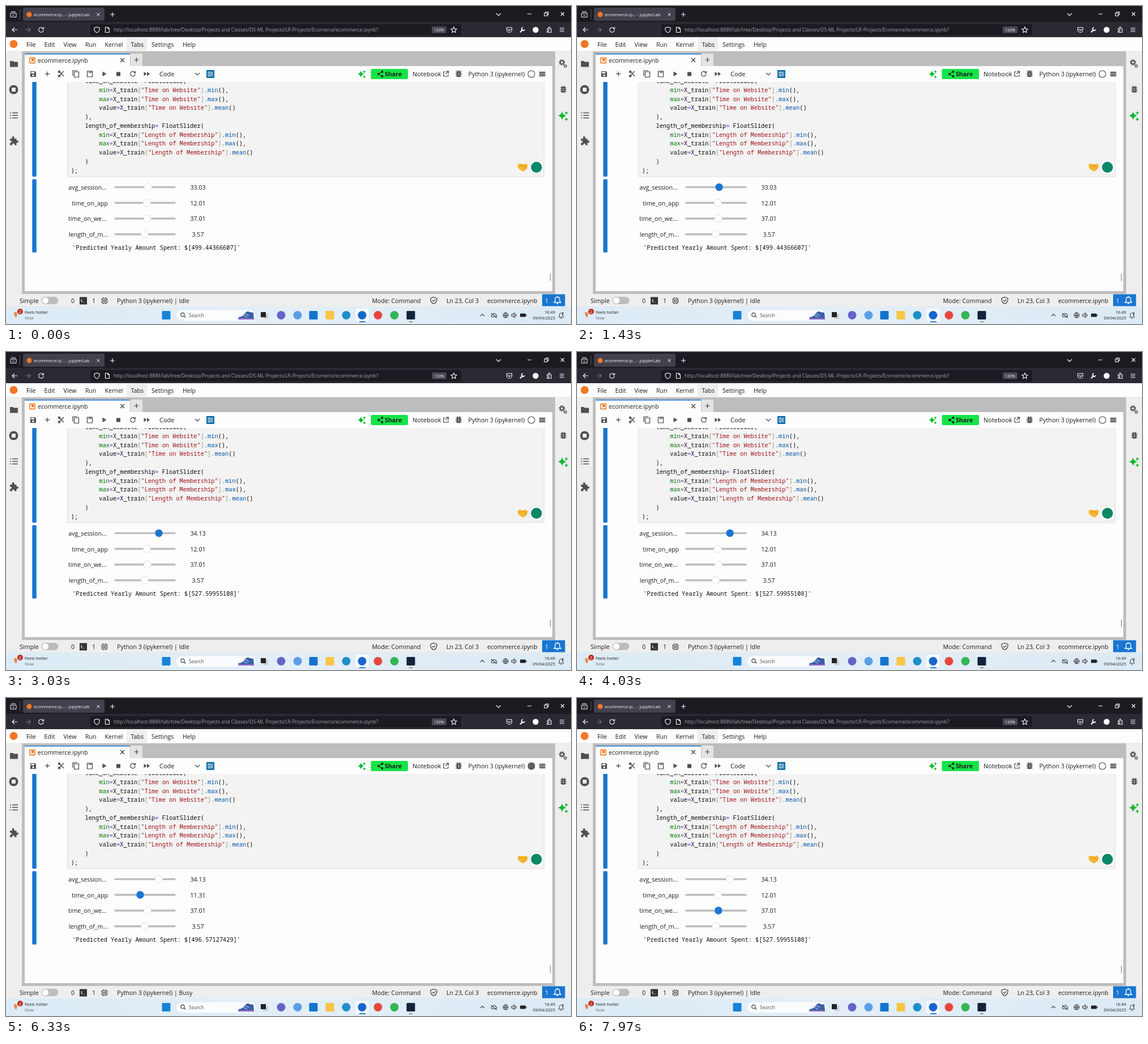
Recreate the animation shown at these times as an HTML page. Size 998x561 px, loop 8000 ms.

```html
<!DOCTYPE html>
<html lang="en">
<head>
<meta charset="utf-8">
<title>Notebook sliders</title>
<style>
  html, body { margin: 0; width: 100%; height: 100%; overflow: hidden; }
  svg { display: block; width: 998px; height: 561px; }
  text { font: 10.65px "Open Sans", "Noto Sans", sans-serif; fill: #1c1c1c; white-space: pre; }
  .code, .code text { font: 10.32px "Noto Sans Mono", "DejaVu Sans Mono", monospace; fill: #0c0c0c; }
  .small { font-size: 7.45px; }
  .search { font-size: 8.5px; fill: #555; }
  .light { fill: #fbfbfe; }
  .mid { text-anchor: middle; }
  .end { text-anchor: end; }
  .line { fill: none; stroke: #424242; stroke-width: 1.2; }
  .lightline { fill: none; stroke: #fbfbfe; stroke-width: 1.1; }
  .ink { fill: #505050; }
  .blue { fill: #1976d2; }
  .green { fill: #10b830; }
  .op { fill: #8a1fd0; }
  .str { fill: #a01418; }
  .fn { fill: #007800; }
  .prop { fill: #05a; }
  .br { fill: #997; }
</style>
</head>
<body>
<svg viewBox="0 0 998 561">
  <defs>
    <path id="star" d="M0-6Q1-1 6 0Q1 1 0 6Q-1 1-6 0Q-1-1 0-6Z"/>
    <g id="sparkles">
      <use href="#star" x="-1"/>
      <use href="#star" transform="translate(5 -4) scale(.45)"/>
      <use href="#star" transform="translate(5 5) scale(.45)"/>
    </g>
    <g id="gear" fill="none" stroke="#505050">
      <circle r="3" stroke-width="2"/>
      <circle r="4.7" stroke-width="1.6" stroke-dasharray="1.85"/>
    </g>
    <g id="bug">
      <path d="M-5-3H5M-5.5 0.5H5.5M-5 4H5M-3-6L-1-4M3-6L1-4" stroke="#505050" stroke-width="1.3"/>
      <rect x="-3.5" y="-4.5" width="7" height="10.5" rx="3.5" fill="#505050"/>
      <path d="M-1.5-.7H1.5M-1.5 2.2H1.5" stroke="#eee"/>
    </g>
    <path id="cross" d="M-3-3L3 3M-3 3L3-3"/>
    <path id="plus" d="M-4 0H4M0-4V4"/>
    <path id="reload" d="M3.5-2.5A4.3 4.3 0 1 0 4.3 0M4.5-5V-1.8H1.3"/>
    <linearGradient id="bar"><stop stop-color="#dcebf5"/><stop offset=".5" stop-color="#e3eef7"/><stop offset="1" stop-color="#dceaf5"/></linearGradient>
    <clipPath id="page"><rect x="33" y="134" width="932" height="369"/></clipPath>
  </defs>

  <!-- Browser chrome -->
  <rect width="998" height="28" fill="#1c1b22"/>
  <rect y="28" width="998" height="27" fill="#2b2a33"/>
  <rect x="30" y="3" width="144" height="23" rx="3" fill="#42414d"/>
  <rect x="149" y="32" width="655" height="20" rx="3" fill="#1c1b22"/>
  <circle cx="41" cy="15" r="4.5" fill="#f37726"/>
  <text class="small light" x="49" y="17.6">ecommerce.ip... - JupyterLab</text>
  <g class="lightline">
    <path d="M8 12.5H18V19.5H8ZM9 10H17M11 15L13 17L15 15" stroke-width="1"/>
    <path d="M24.5 6V23" stroke="#55545f"/>
    <use href="#cross" transform="translate(163 15) scale(.85)"/>
    <use href="#plus" x="188" y="15"/>
    <path d="M866 13L870 17L874 13M921 14H928M951 12.5H956V17.5H951ZM953 12V10.5H958V15.5H956.5"/>
    <use href="#cross" x="983" y="14"/>
    <path d="M20 42H11M15 38L11 42L15 46"/>
    <path d="M34 42H43M39 38L43 42L39 46" stroke="#777680"/>
    <use href="#reload" x="62" y="42"/>
    <path d="M160.5 37L165 38.5V42Q164.5 45.5 160.5 47Q156.5 45.5 156 42V38.5Z"/>
    <path d="M175.5 37.5H180L182.5 40V46.5H175.5ZM180 37.5V40H182.5"/>
    <path d="M791 37L792.5 40.3L796 40.7L793.4 43.1L794.1 46.6L791 44.8L787.9 46.6L788.6 43.1L786 40.7L789.5 40.3Z"/>
    <path d="M884.5 38H893.5V42A4.5 4.5 0 0 1 884.5 42ZM886.5 41L889 43.5L891.5 41"/>
    <path d="M908 46.5L913 41.5" stroke-width="2.2"/>
    <path d="M913 38A2.7 2.7 0 1 0 916 41" stroke-width="1.6"/>
    <path d="M956 40H958.5Q957.5 37 959.5 37Q961.5 37 960.5 40H963V46.5H956V44.5Q959 45 959 43.2Q959 41.5 956 42.3Z"/>
    <path d="M978 39H986M978 42H986M978 45H986"/>
  </g>
  <circle cx="935.5" cy="42" r="5.2" fill="#fff"/>
  <text x="190" y="45.3" style="font-size:8.55px;fill:#a3a2ab">http://localhost:8889/lab/tree/Desktop/Projects and Classes/DS-ML Projects/LR-Projects/Ecomerce/ecommerce.ipynb?</text>
  <rect x="752" y="36" width="26" height="12" rx="2" fill="#4a4953"/>
  <text class="light mid" x="765" y="44.7" style="font-size:7px">133%</text>

  <!-- Menu -->
  <rect y="55" width="998" height="25" fill="#fdfdfd"/>
  <rect x="213" y="56" width="36" height="23" fill="#eee"/>
  <circle cx="13.5" cy="67" r="7" fill="#f37726"/>
  <g id="menu"></g>

  <!-- Workspace -->
  <rect y="79" width="998" height="451" fill="#eee"/>
  <rect x="28" y="80" width="942" height="428" fill="#bdbdbd"/>
  <rect x="33" y="106" width="932" height="397" fill="#fdfdfd"/>
  <rect x="33" y="84" width="186" height="23" fill="#fdfdfd"/>
  <rect class="blue" x="33" y="84" width="186" height="1.5"/>
  <rect x="220" y="84" width="21" height="22" fill="#e4e4e4"/>
  <path d="M42 91.5H51V100.5H42Z" fill="none" stroke="#ef6c00" stroke-width="1.4"/>
  <path d="M45 93H49V98L47 96.5L45 98Z" fill="#ef6c00"/>
  <text x="56" y="99.8">ecommerce.ipynb</text>
  <g class="line">
    <use href="#cross" transform="translate(205.5 95.5) scale(1.15)"/>
    <use href="#plus" x="230.5" y="95"/>
  </g>

  <!-- Toolbar -->
  <path class="ink" d="M43 115H51L53 117V125H43ZM44.5 116V119H50V116ZM48 120.5A1.7 1.7 0 1 0 48 124A1.7 1.7 0 1 0 48 120.5Z" fill-rule="evenodd"/>
  <path class="ink" d="M170.5 115.5L177.5 119.7L170.5 124ZM195 116.5H202V123.5H195ZM243.5 116L248.5 119.7L243.5 123.5ZM249 116L254 119.7L249 123.5Z"/>
  <g class="line">
    <use href="#plus" x="73" y="119.7"/>
    <path d="M93.5 115L102 124M102 115L93.5 124"/><circle cx="94" cy="116" r="1.7"/><circle cx="94" cy="123.5" r="1.7"/>
    <path d="M120.5 116H128.500V125.5H120.5ZM118 123V114H126M143.500 115H152.5V125H143.500ZM145.5 115.5H150.5V117.5H145.5"/>
    <use href="#reload" x="224" y="119.7"/>
    <path d="M334 118L338 122L342 118M776 116H773V124H781V121M777 115H781.5V119.5M781 115.5L776.5 120"/>
    <path d="M942 117H952.5M942 120H952.5M942 123H952.5" stroke-width="1.8"/>
  </g>
  <text x="271" y="124" style="font-size:11px">Code</text>
  <rect x="354" y="113" width="14" height="14" rx="1" fill="#0d6ea8"/>
  <path d="M356 117H366M356 120H366M356 123H366M359 115.5V118.5M363 118.5V121.5M359 121.5V124.5" stroke="#fff"/>
  <use href="#sparkles" class="green" x="628" y="120"/>
  <rect x="644.5" y="111" width="65.5" height="18" rx="2.5" fill="#15e447"/>
  <path d="M664.5 116L658 120L664.5 124" fill="none" stroke="#111"/>
  <g fill="#111"><circle cx="664.5" cy="116" r="1.9"/><circle cx="658" cy="120" r="1.9"/><circle cx="664.5" cy="124" r="1.9"/></g>
  <text x="669" y="123.8" style="font-weight:700">Share</text>
  <text x="718" y="124" style="font-size:11px">Notebook</text>
  <use href="#bug" x="799.5" y="119.5"/>
  <text x="816.5" y="124" style="font-size:10.8px">Python 3 (ipykernel)</text>
  <circle id="kernel" cx="928" cy="120" r="6" stroke="#505050" stroke-width="1.1"/>

  <!-- Cells -->
  <g clip-path="url(#page)">
    <rect x="108.5" y="120" width="842" height="181" fill="#f3f3f3" stroke="#dedee4"/>
    <rect class="blue" x="46.3" y="130" width="7.5" height="171" rx="1.5"/>
    <rect class="blue" x="46.3" y="305.5" width="7.5" height="129.200" rx="1.5"/>
    <g id="code" class="code"></g>
  </g>
  <path d="M904 279L909 278L913 280L918 278L922 281L920 287L914 292L908 289L904 285Z" fill="#f5b62f"/>
  <path d="M909 283L913 280L920 287" fill="none" stroke="#cf8618"/>
  <rect x="925" y="272" width="25" height="25" rx="7" fill="#fff" stroke="#e2e2e2"/>
  <circle cx="937" cy="284.5" r="9.7" fill="#0b8768"/>
  <g id="sliders"></g>
  <text id="result" class="code" x="117" y="429.5"></text>
  <path d="M961.5 472V485" stroke="#777"/>

  <!-- Side bars -->
  <path class="ink" d="M7 97H12L13.5 98.5H21V107.5H7Z"/>
  <circle class="ink" cx="13.5" cy="147.5" r="8"/>
  <rect x="10" y="144" width="7" height="7" rx="1" fill="#eee"/>
  <path d="M7 188.5H9M11 188.5H21M7 193H9M11 193H21M7 197.5H9M11 197.5H21" stroke="#505050" stroke-width="1.7"/>
  <path class="ink" d="M7 234H11Q9.5 230 12.5 230Q15.5 230 14.5 234H18.5V237.5Q22 236.5 22 239Q22 242 18.5 241V245.5H15Q15.5 242.5 13 242.5Q10.5 242.5 11 245.5H7V241.5Q10 242 10 239.5Q10 237 7 237.5Z"/>
  <use href="#gear" x="982" y="99.5"/>
  <use href="#gear" transform="translate(988 106) scale(.6)"/>
  <use href="#bug" x="984.5" y="147"/>
  <use href="#sparkles" class="green" transform="translate(983.5 193.5) scale(1.25)"/>

  <!-- Status bar -->
  <text x="24" y="523.5">Simple</text>
  <rect x="62.5" y="513" width="30" height="13" rx="6.5" fill="#bdbdbd"/>
  <circle cx="69.5" cy="519.5" r="6" fill="#fff" stroke="#aaa" stroke-width=".6"/>
  <text x="115" y="523.5">0</text>
  <rect x="130" y="513.5" width="13" height="13" fill="#333"/>
  <text x="131.5" y="522" class="light" style="font-size:7px">$_</text>
  <text x="152" y="523.5">1</text>
  <path class="line" d="M170 516H178V524H170ZM172.5 518.5H175.5V521.5H172.5ZM172 514V516M176 514V516M172 524V526M176 524V526M168 518H170M168 522H170M178 518H180M178 522H180"/>
  <text id="status" x="196" y="523.5"></text>
  <text x="646.5" y="523.5">Mode: Command</text>
  <path class="line" d="M755.5 513.5L761 515.5V519Q760 523.5 755.5 525.5Q751 523.5 750 519V515.5ZM753 519L755 521L758.5 517.5"/>
  <text x="778" y="523.5">Ln 23, Col 3</text>
  <text x="850" y="523.5">ecommerce.ipynb</text>
  <rect class="blue" x="947" y="508.5" width="40.5" height="21"/>
  <text class="light" x="952" y="523.5">1</text>
  <path d="M968 523H980L978 520.5V517Q978 513.5 974 513.5Q970 513.5 970 517V520.5ZM972.5 525H975.5M974 513V511.5" fill="none" stroke="#fff" stroke-width="1.3"/>

  <!-- Taskbar -->
  <rect y="530" width="998" height="31" fill="url(#bar)"/>
  <path d="M14 541Q19 538 20 544L18 550Q14 547 14 541Z" fill="#e8894a"/>
  <circle cx="25" cy="539" r="5" fill="#c42b1c"/>
  <text class="small light mid" x="25" y="541.6">2</text>
  <text class="small" x="33" y="542.8">Feels hotter</text>
  <text class="small" x="33" y="553" style="fill:#666">Now</text>
  <rect x="301" y="536.5" width="140" height="18.5" rx="9.25" fill="#fafcfe"/>
  <g class="line"><circle cx="312" cy="544.5" r="3.2"/><path d="M314.5 547L317 549.5"/></g>
  <text class="search" x="323" y="549">Search</text>
  <path d="M410 549Q418 549 423 541Q427 537 430 540L437 541L438 552H412Z" fill="#3a5fa8"/>
  <path d="M410 552H438" stroke="#8e6cc9" stroke-width="2.5"/>
  <path d="M420 546L426 549M423 543L429 546" stroke="#b9d5f3" stroke-width="1.3"/>
  <path d="M454 543H463V552H454Z" fill="#c9cdd1"/>
  <path d="M450 540H459V549H450Z" fill="#222"/>
  <rect x="617.5" y="534" width="23" height="23" rx="3" fill="#f8fbfd"/>
  <g id="apps"></g>
  <path d="M624 557H635" stroke="#1976d2" stroke-width="1.8"/>
  <path d="M712 557H718" stroke="#888" stroke-width="1.8"/>
  <g class="line">
    <path d="M838 547L841.5 543.5L845 547M858 548.5Q856 545 859.5 544Q862 540.5 865 544Q868 546 865.5 548.5ZM857 542L867 550"/>
    <circle cx="882.5" cy="545.5" r="4.5"/><path d="M878 545.5H887M882.5 541Q879 545.5 882.5 550Q886 545.5 882.5 541"/>
    <path d="M893 544H895L898 541.5V549.5L895 547H893ZM900 543Q902 545.5 900 548"/>
    <path d="M976 549H985L983.5 547V544Q983 541.5 980.5 541.5Q978 541.5 977.5 544V547ZM979 551H982M982 541H985L982 544H985" stroke-width="1"/>
  </g>
  <rect x="908" y="542.5" width="10" height="6" rx="1.3" fill="#222"/><path d="M919 544V547" stroke="#222"/>
  <text class="small end" x="970" y="542.8">16:49</text>
  <text class="small end" x="970" y="553">09/04/2025</text>
</svg>
<script>
const $ = id => document.getElementById(id);

const menu = { File: 36, Edit: 67.5, View: 101.5, Run: 140, Kernel: 174.5, Tabs: 220.5, Settings: 257, Help: 312 };
$('menu').innerHTML = Object.entries(menu)
  .map(([name, x]) => `<text x="${x}" y="71.7">${name}</text>`).join('');

// Taskbar marks: x, colour, round?
const apps = [
  [283, '#1683d8'], [486, '#6264c7', 1], [515, '#5b9fe6', 1], [543, '#1374cf'], [572, '#f8c544'],
  [601, '#1c8fcb', 1], [629, '#1767cf', 1], [657, '#e5483a', 1], [686, '#35b553', 1], [715, '#13243b']
];
$('apps').innerHTML = apps.map(([x, fill, round]) =>
  `<rect x="${x - 7.5}" y="538" width="15" height="15" rx="${round ? 7.5 : 1.5}" fill="${fill}"/>`).join('');

// Code listing
const args = name => ['min', 'max', 'mean'].map(fn =>
  `        ${fn === 'mean' ? 'value' : fn}=X_train["${name}"].${fn}()${fn === 'mean' ? '' : ','}`);
const lines = [
  '    time_on_website= FloatSlider(', ...args('Time on Website'), '    ),',
  '    length_of_membership= FloatSlider(', ...args('Length of Membership'), '    )', ');'
];
const tokens = /(".*?")|(=)|(\.\w+)|(\bmin\b|\bmax\b)|([[\]])/g;
const kinds = ['str', 'op', 'prop', 'fn', 'br'];
const highlight = line => line.replace(tokens, (word, ...groups) =>
  `<tspan class="${kinds[groups.slice(0, 5).findIndex(Boolean)]}">${word}</tspan>`);
$('code').innerHTML = lines.map((line, i) =>
  `<text x="114.7" y="${136.1 + i * 15.77}">${highlight(line)}</text>`).join('');

// Keys are [ms, value]; hover is [enter, leave]
const sliders = [
  { label: 'avg_session...', base: 33.03, x: 251, scale: 17.3, hover: [1000, 4670], keys: [[2000, 33.03], [2767, 34.13]] },
  { label: 'time_on_app', base: 12.01, x: 248.7, scale: 16.7, hover: [5000, 7400],
    keys: [[5166.7, 12.01], [5233.3, 11.41], [5400, 10.81], [5967, 10.81], [6317, 11.26], [6767, 12.01]] },
  { label: 'time_on_we...', base: 37.01, x: 249.8, scale: 17, hover: [7650, 9000], keys: [[0, 37.01]] },
  { label: 'length_of_m...', base: 3.57, x: 245, scale: 17, hover: [9000, 9900], keys: [[0, 3.57]] }
];
$('sliders').innerHTML = sliders.map((s, i) => {
  const y = 319.6 + i * 27.7;
  return `<text class="end" x="${i % 2 ? 180 : 177.5}" y="${y + 4.3}">${s.label}</text>
    <rect x="191.5" y="${y - 1.7}" width="108" height="3.4" rx="1" fill="#bdbdbd"/>
    <g class="knob"><circle cy="${y}" r="6.5" fill="#fff" stroke="#e0e0e0"/><circle class="blue" cy="${y}" r="6.7"/></g>
    <text class="mid value" x="339" y="${y + 4.3}"></text>`;
}).join('');
const knobs = document.querySelectorAll('.knob');
const values = document.querySelectorAll('.value');

const clamp = v => Math.max(0, Math.min(1, v));
function valueAt({ keys, base }, t) {
  let v = keys[0][1];
  for (let i = 1; i < keys.length; i++) {
    const [t0, a] = keys[i - 1], [t1, b] = keys[i];
    if (t >= t0) v = a + (b - a) * clamp((t - t0) / (t1 - t0));
  }
  return base + Math.round((v - base) * 10) / 10;
}

const step = 100 / 3;
function draw(now) {
  const t = Math.floor((now % 8000 + 4) / step) * step;
  sliders.forEach((s, i) => {
    const v = valueAt(s, t), [enter, leave] = s.hover;
    values[i].textContent = v.toFixed(2);
    knobs[i].setAttribute('transform', `translate(${s.x + (v - s.base) * s.scale})`);
    knobs[i].lastChild.setAttribute('opacity', clamp((t - enter) / 100) - clamp((t - leave) / 100));
  });
  // The kernel answers one step after the slider moves
  const change = sliders.map(s => valueAt(s, t - step) - s.base);
  const spent = 499.44366607 + change[0] * 25.5962591 + change[1] * 38.78534599;
  $('result').textContent = `'Predicted Yearly Amount Spent: $[${spent.toFixed(8)}]'`;
  const busy = sliders.some(s => valueAt(s, t) !== valueAt(s, t - 150));
  $('status').textContent = 'Python 3 (ipykernel) | ' + (busy ? 'Busy' : 'Idle');
  $('kernel').setAttribute('fill', busy ? '#616161' : '#fff');
}

const start = performance.now();
(function loop() {
  draw(performance.now() - start);
  requestAnimationFrame(loop);
})();
</script>
</body>
</html>
```
